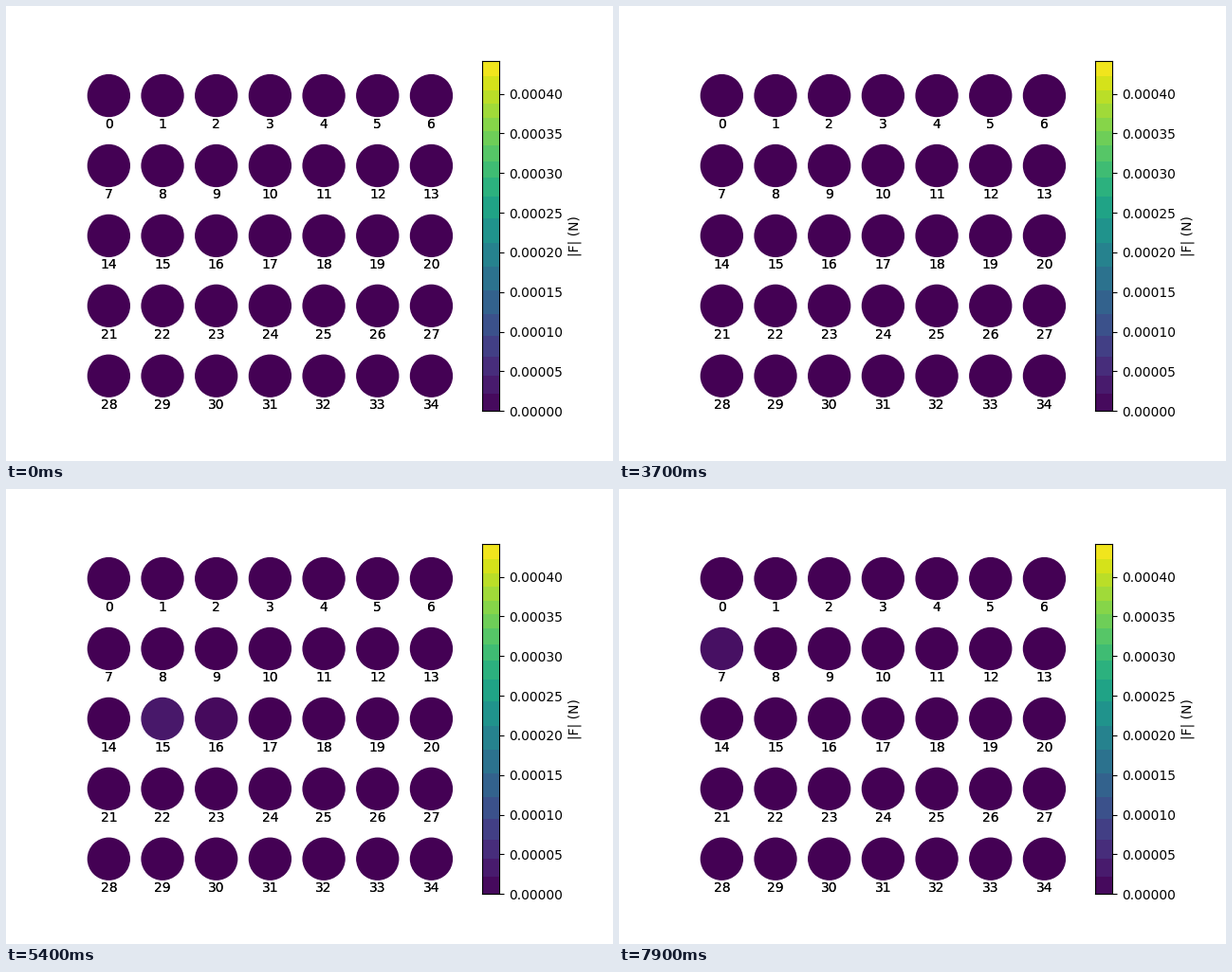
Animation of 640 by 480 pixels, one loop 8000 ms. Source, as a matplotlib script:

```python
import numpy as np
import matplotlib.pyplot as plt
from matplotlib.animation import FuncAnimation

plt.rcParams["font.family"] = "DejaVu Sans"

COLS, ROWS = 7, 5
INTERVAL, FRAMES = 100, 80
F_MAX = 4.418e-4
BANDS = 19
FADE = 500  # ms from rest to the peak of a touch, and back
CMAP = plt.get_cmap("viridis")

# Touches: peak time (ms), peak force (uN), sensors from strongest to weakest
TOUCHES = [
    (3200, 92, [11]),
    (4200, 70, [8, 10, 16, 23]),
    (4800, 48, [7, 8, 22, 16, 15, 10, 9]),
    (5400, 28, [15, 16]),
    (6800, 24, [15]),
    (7900, 18, [7]),
]


def forces(t):
    values = np.zeros(COLS * ROWS)
    for peak_time, peak, sensors in TOUCHES:
        strength = max(0, 1 - abs(t - peak_time) / FADE)
        shares = np.linspace(1, 0.4, len(sensors))
        values[sensors] += peak * 1e-6 * strength * shares
    return values


def band_edges():
    """Split the scale into bands that are narrower where its colour changes fast."""
    levels = np.linspace(0, 1, 65)
    steps = np.linalg.norm(np.diff(CMAP(levels), axis=0), axis=1) ** 0.5
    travel = np.append(0, np.cumsum(steps))
    return np.interp(np.linspace(0, travel[-1], BANDS + 1), travel, levels)


def draw_colorbar(fig):
    ax = fig.add_axes([501.6 / 640, 0.11, 18.48 / 640, 0.77])
    edges = band_edges()
    for low, high in zip(edges, edges[1:]):
        ax.axhspan(low * F_MAX, high * F_MAX, lw=0, antialiased=False,
                   color=CMAP((low + high) / 2))
    ticks = np.arange(0, F_MAX, 5e-5)
    ax.set(xlim=(0, 1), ylim=(0, F_MAX), xticks=[])
    ax.set_yticks(ticks, [f"{v:.5f}" for v in ticks])
    ax.yaxis.tick_right()
    ax.yaxis.set_label_position("right")
    ax.set_ylabel("|F| (N)")


fig = plt.figure(figsize=(6.4, 4.8), dpi=100, facecolor="white")
ax = fig.add_axes([0.125, 0.11, 0.62, 0.77])
ax.set(xlim=(-0.5, COLS - 0.5), ylim=(ROWS - 0.5, -0.5))
ax.axis("off")

sensor_ids = np.arange(COLS * ROWS)
y, x = np.divmod(sensor_ids, COLS)
dots = ax.scatter(x, y, s=1000, c=forces(0), cmap=CMAP, vmin=0, vmax=F_MAX)
for i in sensor_ids:
    # Printed twice for slightly heavier digits
    for _ in range(2):
        ax.text(x[i], y[i] + 0.47, str(i), ha="center", va="baseline")
draw_colorbar(fig)


def update(frame):
    dots.set_array(forces(frame * INTERVAL))
    return [dots]


anim = FuncAnimation(fig, update, frames=FRAMES, interval=INTERVAL,
                     repeat=True, repeat_delay=0)
plt.show()
```
